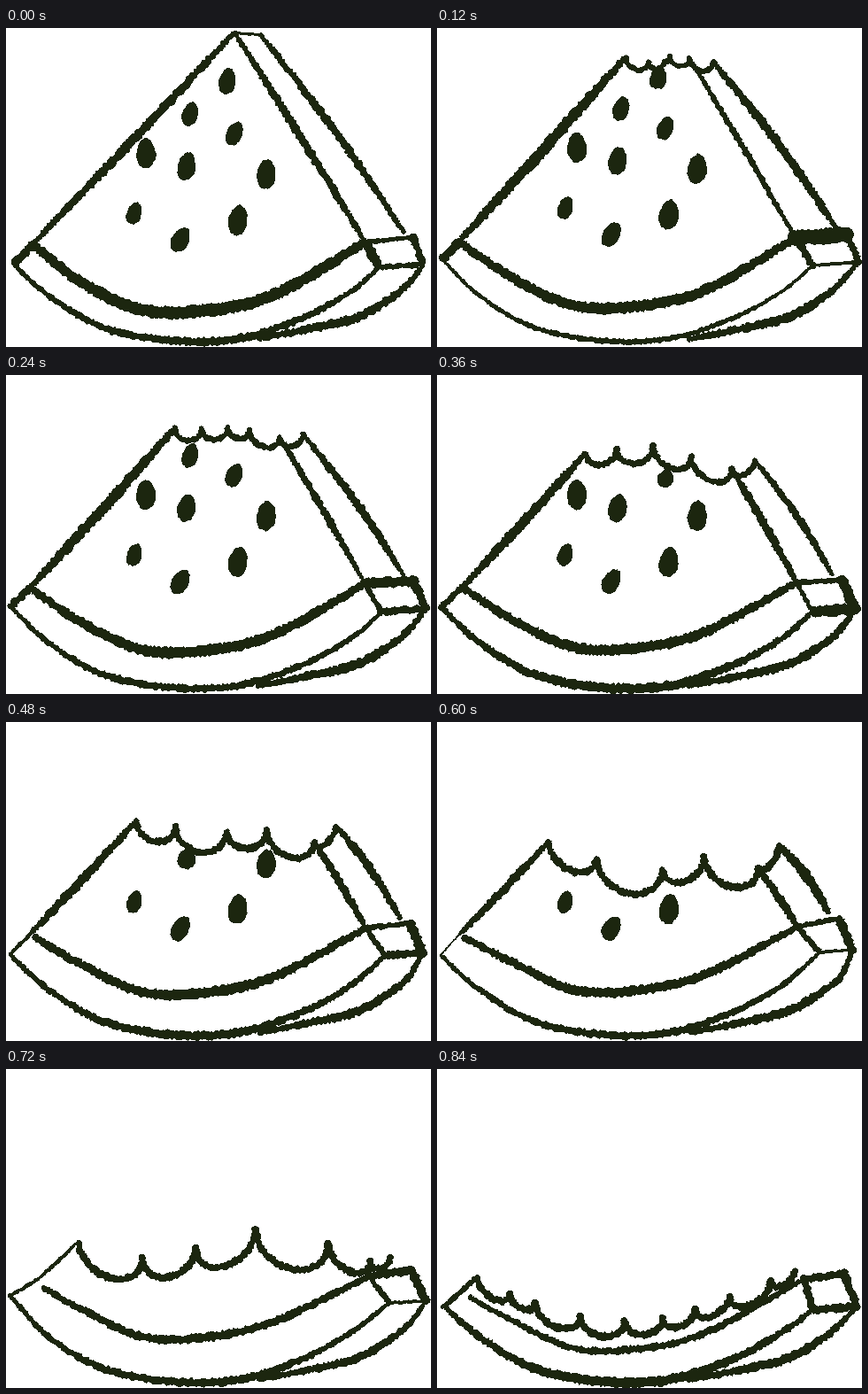
Recreate the animation shown at these times as an HTML page. Size 480 px wide and 360 px high, loop 960 ms.

```html
<!DOCTYPE html>
<html lang="en">
<head>
<meta charset="utf-8">
<title>Watermelon</title>
<style>
html, body { margin: 0; width: 100%; height: 100%; overflow: hidden; background: #fff; }
svg { display: block; width: 100vw; height: 100vh; }
</style>
</head>
<body>
<svg viewBox="0 0 480 360"><path id="ink" fill="#1c260f" shape-rendering="crispEdges"/></svg>
<script>
const STEP = 120;
let d = '', seed = 1;

const rand = () => (seed = (seed * 16807) % 2147483647) / 2147483647;
const jitter = size => (rand() - 0.5) * size;
const lerp = (a, b, u) => a + (b - a) * u;
const mix = (a, b, u = 0.5) => typeof a === 'number' ? lerp(a, b, u)
  : Array.isArray(a) ? a.map((v, i) => mix(v, b[i], u))
  : Object.fromEntries(Object.keys(a).map(k => [k, mix(a[k], b[k], u)]));
const pair = p => p[0].toFixed(1) + ' ' + p[1].toFixed(1);
const polygon = pts => 'M' + pts.map(pair).join('L') + 'Z';

// Catmull-Rom curve, sampled about every two pixels
function curve(knots) {
  const last = knots.length - 1, pts = [];
  for (let i = 0; i < last; i++) {
    const a = knots[Math.max(i - 1, 0)], b = knots[i], c = knots[i + 1], e = knots[Math.min(i + 2, last)];
    const n = Math.max(2, Math.round(Math.hypot(c[0] - b[0], c[1] - b[1]) / 2.2));
    for (let k = 0; k < n; k++) {
      const t = k / n;
      pts.push([0, 1].map(j => b[j] + t / 2 * (c[j] - a[j] +
        t * (2 * a[j] - 5 * b[j] + 4 * c[j] - e[j] + t * (3 * (b[j] - c[j]) + e[j] - a[j])))));
    }
  }
  return [...pts, knots[last]];
}

// Ragged ink stroke whose width swells towards the middle
function stroke(knots, weight, swell = 0.4) {
  if (!weight) return;
  const pts = curve(knots), last = pts.length - 1, near = [], far = [];
  const width = u => weight * (1 - swell + swell * 1.35 * Math.sin(Math.PI * u));
  pts.forEach(([x, y], i) => {
    const p = pts[Math.max(i - 1, 0)], q = pts[Math.min(i + 1, last)];
    const len = Math.hypot(q[0] - p[0], q[1] - p[1]) || 1;
    const nx = (p[1] - q[1]) / len, ny = (q[0] - p[0]) / len;
    const w = width(i / last), rough = Math.min(2.8, w * 0.34);
    const r = w / 2 + jitter(rough), s = w / 2 + jitter(rough);
    near.push([x + nx * r, y + ny * r]);
    far.unshift([x - nx * s, y - ny * s]);
  });
  const r = width(0) / 2, cap = p => `A${r} ${r} 0 0 0 ${pair(p)}`;
  d += 'M' + near.map(pair).join('L') + cap(far[0]) + 'L' + far.map(pair).join('L') + cap(near[0]) + 'Z';
}

// Straight edge pushed sideways by bow pixels
function edge(a, b, weight, bow = 0) {
  const len = Math.hypot(b[0] - a[0], b[1] - a[1]) || 1;
  const mid = [(a[0] + b[0]) / 2 + (b[1] - a[1]) / len * bow, (a[1] + b[1]) / 2 - (b[0] - a[0]) / len * bow];
  stroke([a, mid, b], weight);
}

// Tooth mark hanging between two cusps
function bite(a, b, weight, sag) {
  const arc = [];
  for (let i = 0; i <= 8; i++) {
    const turn = Math.PI * i / 8, u = (1 - Math.cos(turn)) / 2;
    arc.push([lerp(a[0], b[0], u), lerp(a[1], b[1], u) + Math.sin(turn) * sag * (b[0] - a[0])]);
  }
  stroke(arc, weight, 0.1);
}

// Seed shape, cut off where the bite reaches it
function pip([x, y, size, tilt], limit) {
  const top = Math.max(y - size, limit), h = (y + size - top) / 2, pts = [];
  if (h < 9) return;
  const c = Math.cos(tilt), s = Math.sin(tilt);
  for (let i = 0; i < 30; i++) {
    const a = -i / 15 * Math.PI, k = 1 + jitter(0.12);
    const px = Math.cos(a) * size * 0.64 * k * (1 + 0.12 * Math.sin(a)), py = Math.sin(a) * h * k;
    pts.push([x + px * c - py * s, top + h + px * s + py * c]);
  }
  d += polygon(pts);
}

const pips = [
  [250, 54, 15, 0.2], [208, 91, 14, 0.3], [258, 113, 14, 0.4],
  [158, 135, 17, 0], [204, 150, 16, 0.2], [294, 159, 17, 0.1],
  [145, 203, 13, 0.3], [197, 233, 15, 0.5], [262, 211, 17, 0.15]
];

// cusps: bitten top; limit: how far seeds are eaten; rim: start and depth of the inner rind line
const whole = {
  cusps: [[258, 5], [288, 8]], sag: 0, limit: 0, drop: 6,
  heel: [30, 244], foot: [9, 267], rim: [30, 244, 317],
  block: [[406, 242], [460, 236], [471, 267], [421, 270]], sides: [5, 8, 6, 11],
  w: { left: 9, inner: 8, outer: 8, rim: 13, base: 8, under: 9, foot: 10, bite: 3 }
};
const nibbled = {
  cusps: [[213, 33], [239, 38], [257, 38], [263, 32], [285, 34], [312, 38]], sag: 0.45, limit: 44, drop: 0,
  heel: [25, 241], foot: [6, 261], rim: [25, 241, 312],
  block: [[405, 237], [463, 233], [476, 264], [424, 268]], sides: [17, 8, 4, 8],
  w: { left: 11, inner: 6, outer: 9, rim: 11.5, base: 5.5, under: 9, foot: 10, bite: 6 }
};
const third = {
  cusps: [[168, 88], [203, 83], [244, 80], [287, 92], [333, 106], [359, 96]], sag: 0.45, limit: 107, drop: 0,
  heel: [32, 236], foot: [5, 262], rim: [34, 243, 306],
  block: [[406, 234], [458, 232], [472, 264], [424, 267]], sides: [6, 12, 13, 5],
  w: { left: 10, inner: 8, outer: 7, rim: 11, base: 9.5, under: 9, foot: 7, bite: 7 }
};
const half = {
  cusps: [[126, 135], [180, 153], [255, 166], [302, 152], [363, 165], [387, 139]], sag: 0.45, limit: 180, drop: 0,
  heel: [26, 239], foot: [4, 263], rim: [32, 244, 301],
  block: [[407, 231], [454, 222], [469, 257], [432, 260]], sides: [6, 10, 4, 7],
  w: { left: 8, inner: 8, outer: 10, rim: 10, base: 7.5, under: 9, foot: 2, bite: 8 }
};
const scraps = {
  cusps: [[82, 194], [154, 213], [214, 202], [282, 181], [364, 197], [411, 217], [434, 213]], sag: 0.45, limit: 300, drop: 0,
  heel: [36, 237], foot: [5, 256], rim: [42, 247, 301],
  block: [[410, 234], [458, 227], [474, 262], [433, 264]], sides: [9, 10, 4, 6],
  w: { left: 4, inner: 3, outer: 0, rim: 9, base: 8, under: 8, foot: 4, bite: 8 }
};
const rind = {
  cusps: [[45, 235], [82, 254], [111, 264], [162, 279], [212, 284], [255, 281], [292, 271], [330, 256], [377, 239], [404, 228]],
  sag: 0.4, limit: 300, drop: 0,
  heel: [45, 235], foot: [8, 268], rim: [38, 258, 314],
  block: [[415, 237], [460, 231], [474, 268], [424, 272]], sides: [9, 9, 9, 9],
  w: { left: 0, inner: 0, outer: 0, rim: 7.5, base: 10, under: 9, foot: 6, bite: 8 }
};
const poses = [whole, nibbled, mix(nibbled, third), third, mix(third, half), half, scraps, rind];

function draw({ cusps, sag, limit, drop, heel, foot, rim, block, sides, w }) {
  const [a, b, c, e] = block, [x, y, low] = rim, n = cusps.length;
  cusps.slice(1).forEach((p, i) => bite(cusps[i], p, w.bite, sag));
  edge(cusps[0], heel, w.left, 1);
  edge(cusps[n - 2], a, w.inner, 1);
  edge(cusps[n - 1], [b[0] - 11, b[1] - 6], w.outer, 4);
  stroke([heel, foot], w.foot, 0);
  stroke([[x, y], [85, low - 30], [150, low], [215, low + 3], [300, low - 15], a], w.rim, 0.25);
  stroke([foot, [48, 302], [110, 338], [190, 353], [265, 350], [335, 327], [390, 297], e], w.base);
  stroke([[285, 351], [350, 338], [395, 327], [430, 308], [455, 288], c], w.under);
  block.forEach((p, i) => stroke([p, block[(i + 1) % 4]], sides[i], 0));
  pips.forEach(([px, py, ...look]) => pip([px, py + drop, ...look], limit));
}

const shapes = poses.map((pose, i) => {
  d = '';
  seed = 91 + i * 977;
  draw(pose);
  return d;
});

const ink = document.getElementById('ink');
let shown = -1;

function render(t) {
  const i = Math.floor(t / STEP) % shapes.length;
  if (i !== shown) ink.setAttribute('d', shapes[shown = i]);
}

const start = performance.now();
function tick() {
  render(performance.now() - start);
  requestAnimationFrame(tick);
}
tick();
</script>
</body>
</html>
```
